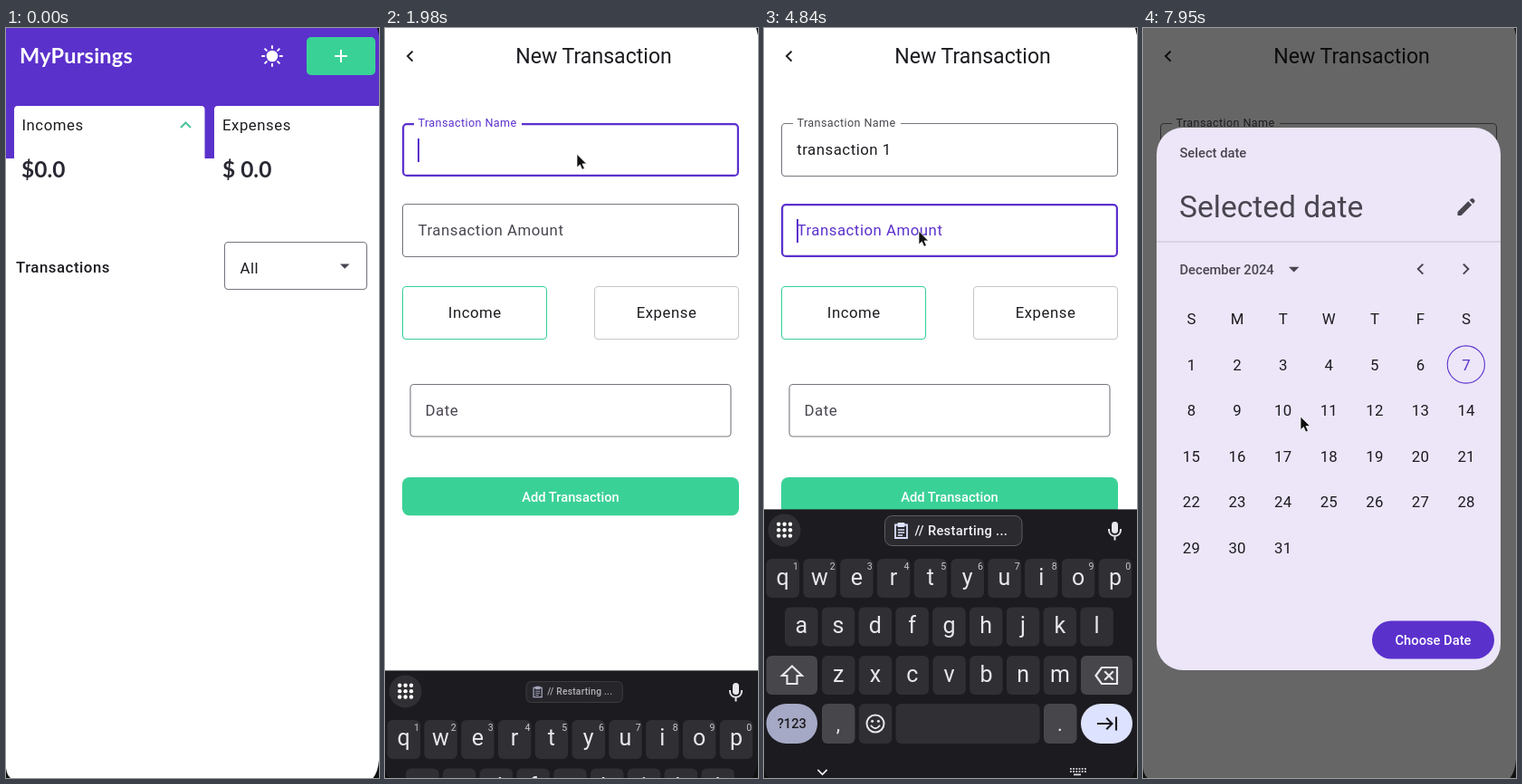
These frames come from a looping animation (412 by 828 pixels, 8 s). An HTML page:

```html
<!DOCTYPE html>
<html lang="en">
<head>
<meta charset="utf-8">
<title>Budget app</title>
<style>
  html, body { margin: 0; width: 100%; height: 100%; overflow: hidden; background: #fff; }
  svg { display: block; width: 412px; height: 828px; }
  text { font-family: Roboto, sans-serif; white-space: pre; }
  .round { font-family: Lato, sans-serif; font-weight: 700; }
  .line { fill: none; stroke-linecap: square; }
</style>
</head>
<body>
<svg id="stage" viewBox="0 0 412 828"></svg>
<script>
const LOOP = 8000;
const INK = '#1d1b20', SOFT = '#49454f', EDGE = '#79757f';
const PURPLE = '#5b31cc', GREEN = '#3ad197';
const KEY = '#303034', KEY2 = '#47464b', PALE = '#dde2ff', GLYPH = '#e8e7eb';

// ---- markup helpers
const text = (x, y, s, size, fill = INK, more = '') =>
  `<text x="${x}" y="${y}" font-size="${size}" fill="${fill}" ${more}>${s}</text>`;
const MID = 'text-anchor="middle" ';
const WIDE = 'letter-spacing=".52" ';
const BOLD = 'font-weight="500" ';
const box = (x, y, w, h, r, fill, more = '') =>
  `<rect x="${x}" y="${y}" width="${w}" height="${h}" rx="${r}" fill="${fill}" ${more}/>`;
const frame = (x, y, w, h, color, more = '') =>
  box(x, y, w, h, 4, 'none', `stroke="${color}" stroke-width="1.1" ${more}`);
const line = (d, color, w = 2, more = '') =>
  `<path class="line" d="${d}" stroke="${color}" stroke-width="${w}" ${more}/>`;
const shape = (d, fill) => `<path d="${d}" fill="${fill}"/>`;
const group = (body, more = '') => `<g ${more}>${body}</g>`;
const at = (x, y, body) => group(body, `transform="translate(${x} ${y})"`);
const times = (n, f) => Array.from({ length: n }, (_, i) => f(i)).join('');

// ---- home screen
function home() {
  const ray = i => `<path d="M0-8.7V-11" stroke="#fff" stroke-width="2" stroke-linecap="round" transform="rotate(${i * 45})"/>`;
  return box(0, 0, 412, 828, 0, '#fff') + box(0, 0, 412, 144, 0, PURPLE) +
    text(15, 39, 'MyPursings', 23.5, '#fff', 'class="round" letter-spacing=".2"') +
    at(294, 31, '<circle r="6.3" fill="#fff"/>' + times(8, ray)) +
    box(332, 10, 76, 42, 5, GREEN) + line('M364 31H376M370 25V37', '#fff', 2) +
    box(9, 86, 210.5, 90, 4, '#fff') + box(230, 86, 190, 90, 4, '#fff') +
    text(17.5, 113, 'Incomes', 16.8, INK, WIDE) + text(239, 113, 'Expenses', 16.8, INK, WIDE) +
    line('M193.7 109.3L198.5 104.5 203.3 109.3', '#4cc39a') +
    text(17, 164.5, '$0.0', 24.5, '#2a2833', 'class="round"') +
    text(239, 164.5, '$ 0.0', 24.5, '#2a2833', 'class="round"') +
    text(11, 269.5, 'Transactions', 16.8, INK, BOLD + WIDE) +
    frame(241.5, 236.5, 157, 52, EDGE) + text(258.5, 271, 'All', 16.8, INK, WIDE) +
    shape('M369 260.5H379.5L374.2 265.8z', SOFT);
}

// ---- form
const field = (id, y, label) =>
  frame(19.5, y + .5, 371, 58, EDGE, `id="${id}Box"`) +
  box(32, y - 2, 0, 5, 0, '#fff', `id="${id}Gap"`) +
  text(36.5, y + 35, label, 16.8, SOFT, `id="${id}Label" letter-spacing=".031em"`) +
  text(36.2, y + 35, '', 16.8, INK, `id="${id}Text" letter-spacing=".52"`);

function form() {
  return box(0, 0, 412, 828, 0, '#fff') +
    line('M29.8 26.3L25 31.1 29.8 35.9', INK) +
    text(230.5, 39, 'New Transaction', 23.1, INK, MID) +
    field('name', 105, 'Transaction Name') + field('sum', 194, 'Transaction Amount') +
    frame(19.5, 285.5, 159, 58, GREEN) + frame(231.5, 285.5, 159, 58, '#c8c6cb') +
    text(99.3, 320, 'Income', 16.8, INK, MID + WIDE) +
    text(311, 320, 'Expense', 16.8, INK, MID + WIDE) +
    frame(28, 393.5, 354, 57.5, EDGE) + text(44.5, 428, 'Date', 16.8, SOFT, WIDE) +
    box(19, 496, 372, 42.3, 8, GREEN) +
    text(205, 523, 'Add Transaction', 14.7, '#fff', MID + BOLD) +
    box(36, 141, 51, 1.4, 0, INK, 'id="under"') +
    box(36, 122, 2, 26, 0, PURPLE, 'id="caret"');
}

// ---- keyboards
const eraser = (x, y, color) => at(x, y,
  line('M-12 0L-5.5-9H11.5V9H-5.5z', color, 2.2) + line('M-1.5-4L6.5 4M6.5-4L-1.5 4', color, 2.2));

function chip(x, w, label) {
  const icon = line('M-6.5-6.5H6.5V8H-6.5z', PALE, 1.8) + box(-4, -9, 8, 5, 1, PALE) +
    line('M-3-1H3M-3 2H3M-3 5H1', PALE, 1.3);
  return box(x + .5, 538.5, w, 33, 8, '#2b2a2f', 'stroke="#5f5e64"') +
    at(x + 18.5, 555, icon) + text(x + 33.5, 560, label, 14.7, '#f2f1f5', BOLD + 'letter-spacing=".3"');
}

function letters() {
  const key = (x, y, c, w = 36.5) => box(x, y, w, 43, 6, KEY) + text(x + 18.2, y + 28.5, c, 25, GLYPH, MID);
  const row = (s, x, y) => times(s.length, i => key(x + 40.8 * i, y, s[i]));
  const digit = i => text(35 + 40.8 * i, 598, (i + 1) % 10, 10.5, '#c9c8cd', MID);
  const dot = i => `<circle cx="${16.2 + 6.4 * (i % 3)}" cy="${547.8 + 6.4 * (i / 3 | 0)}" r="2.2" fill="#fff"/>`;
  const mic = box(-3.5, -10, 7, 13, 3.5, GLYPH) + line('M-6.5-1C-6.5 8 6.5 8 6.5-1M0 6V9.5', GLYPH, 2);
  const smile = '<circle r="9.5" fill="none" stroke="#e8e7eb" stroke-width="2"/>' +
    '<circle cx="-3.4" cy="-2.8" r="1.5" fill="#e8e7eb"/><circle cx="3.4" cy="-2.8" r="1.5" fill="#e8e7eb"/>' +
    line('M-4.5 2.5Q0 8 4.5 2.5', GLYPH, 1.9);
  return '<circle cx="22.5" cy="554.5" r="18" fill="#303034"/>' + times(9, dot) + at(387.5, 555, mic) +
    group(chip(133, 151.5, '// Restarting ...'), 'id="chip"') +
    row('qwertyuiop', 2.5, 586) + times(10, digit) + row('asdfghjkl', 23, 639.5) + row('zxcvbnm', 64, 693) +
    box(2.5, 693, 56.5, 43, 6, KEY2) + box(350, 693, 57, 43, 6, KEY2) +
    line('M31 704.5L42 715H36.5V724H25.5V715H20z', GLYPH, 2.1) + eraser(378.5, 715, GLYPH) +
    box(2.5, 746, 56.5, 44, 22, '#a6a9c5') + text(30.8, 773, '?123', 14.7, INK, MID + BOLD) +
    box(64, 746, 36.5, 44, 6, KEY2) + text(82, 776, ',', 22, GLYPH, MID) +
    box(104.8, 746, 36.5, 44, 6, KEY) + at(123, 768, smile) +
    box(145.5, 746, 159, 44, 6, KEY) +
    box(309, 746, 36.5, 44, 6, KEY2) + text(327, 776, '.', 22, GLYPH, MID) +
    box(350, 746, 57, 44, 22, PALE) + line('M369 768H384M379 762.5L384.5 768 379 773.5M389 761.5V774.5', INK, 2.1);
}

function digits() {
  const tints = [KEY2, KEY2, '#ffd7f8', PALE];
  const key = i => {
    const c = i % 4, r = i / 4 | 0, x = 2.5 + 102.4 * c, y = 586 + 52.6 * r;
    return box(x, y, 97.5, 46.5, 23, c < 3 ? KEY : tints[r]) +
      (c < 3 ? text(x + 49, y + 34.5, '123456789,0.'[r * 3 + c], 31, GLYPH, MID) : '');
  };
  return chip(102, 169, '// Restarting filt...') + times(16, key) +
    line('M353 611H364.5', GLYPH, 2) + line('M348 660V664H369V660', GLYPH, 2) +
    eraser(358.5, 715, INK) + line('M350.5 767.5L355.5 772.5 366 762', INK, 2);
}

function keyboard() {
  const speck = i => box(338 + 3.2 * (i % 6), 817 + 3 * (i / 6 | 0), 1.8, 1.8, 0, '#d8d7db');
  return box(0, 531.4, 412, 310, 0, '#1c1b20') +
    group(letters(), 'id="abc"') + group(digits(), 'id="num"') +
    line('M60 819.5L64.5 824 69 819.5', '#fff', 1.7) + times(12, speck) + box(342, 823.4, 8, 1.8, 0, '#d8d7db');
}

// ---- date dialog
function dialog() {
  const col = i => 53.5 + 50.6 * (i % 7);
  const day = i => text(col(i), 377.5 + 50.6 * (i / 7 | 0), i + 1, 16.8, i === 6 ? PURPLE : INK, MID + 'letter-spacing=".2"');
  return box(15, 110, 380, 599, 29, '#ece6f8') +
    text(40.5, 142.5, 'Select date', 14.7, SOFT, BOLD) +
    text(40, 209, 'Selected date', 33.6, SOFT) +
    at(357, 197.5, shape('M-9.5 9.5V5.5L2.2-6.2 6.2-2.2-5.5 9.5zM3.6-7.6L5.8-9.2Q6.8-9.8 7.8-9L9.2-7.5Q9.8-6.5 9.2-5.6L7.6-3.6z', SOFT)) +
    box(15, 235.5, 380, 1, 0, '#c8c2d0') +
    text(40.5, 271.5, 'December 2024', 14.7, SOFT, BOLD) +
    shape('M161 263.7H172.4L166.7 269.4z', SOFT) +
    line('M308.6 261.3L303.8 266.1 308.6 270.9M354.5 261.3L359.3 266.1 354.5 270.9', SOFT) +
    times(7, i => text(col(i), 327, 'SMTWTFS'[i], 16.8, INK, MID)) + times(31, day) +
    `<circle cx="356.8" cy="371.5" r="20.6" fill="none" stroke="${PURPLE}" stroke-width="1.1"/>` +
    box(253, 654.5, 135, 42, 21, PURPLE) +
    text(320.5, 681, 'Choose Date', 14.7, '#fff', MID + BOLD);
}

const stage = document.getElementById('stage');
stage.innerHTML = group(home(), 'id="home"') + group(form(), 'id="form"') + group(keyboard(), 'id="keys"') +
  box(0, 0, 412, 828, 0, '#000', 'id="scrim"') + group(dialog(), 'id="dialog"') +
  shape('M0 817Q1 825 5 828H0zM412 808Q411 821 405.5 828H412zM412 0V8L410 0z', '#111') +
  '<path id="mouse" d="M0 0V14.6L3.4 11.6 5.8 17 8.4 15.8 6 10.6H10.6z" fill="#111" stroke="#fff" stroke-width=".7"/>';
const ui = {};
stage.querySelectorAll('[id]').forEach(e => ui[e.id] = e);

// ---- timing
const clamp = v => Math.max(0, Math.min(1, v));
const span = (t, a, b) => clamp((t - a) / (b - a));
function bezier(x1, y1, x2, y2) {
  const f = (a, b, s) => 3 * a * s * (1 - s) ** 2 + 3 * b * s * s * (1 - s) + s ** 3;
  return x => {
    let lo = 0, hi = 1;
    for (let i = 0; i < 20; i++) {
      const m = (lo + hi) / 2;
      if (f(x1, x2, m) < x) lo = m; else hi = m;
    }
    return f(y1, y2, (lo + hi) / 2);
  };
}
const standard = bezier(.4, 0, .2, 1), emphasized = bezier(.2, 0, 0, 1);

const typed = {
  name: { s: 'transaction 1', at: [2440, 2590, 2690, 2790, 2890, 2990, 3370, 3570, 3685, 3800, 3800, 3915, 4030] },
  sum: { s: '2500', at: [5720, 5980, 6130, 6200] },
};
const track = [
  [70, 265, 822], [680, 368, 24], [920, 368, 24], [1200, 291, 94.5], [1600, 212, 139.3], [4300, 212, 139.3],
  [4640, 171, 224.3], [6660, 171, 224.3], [6960, 258, 552], [7280, 121, 433.5], [7560, 121, 433.5], [7950, 174, 429],
];

function mouseAt(t) {
  let i = track.findIndex(k => k[0] > t);
  if (i < 0) return track[track.length - 1].slice(1);
  i = Math.max(i, 1);
  const [a, x, y] = track[i - 1], [b, u, v] = track[i], p = span(t, a, b);
  return [x + (u - x) * p, y + (v - y) * p];
}

function set(e, attrs) {
  for (const k in attrs) e.setAttribute(k, attrs[k]);
}
const show = (e, on) => e.setAttribute('visibility', on ? 'visible' : 'hidden');

function drawField(id, y, gap, up, focused, t) {
  const { s, at: keys } = typed[id], n = keys.filter(k => k <= t).length;
  const inset = focused ? 1.1 : .5; // the outline grows inwards
  set(ui[id + 'Box'], {
    x: 19 + inset, y: y + inset, width: 372 - 2 * inset, height: 59 - 2 * inset,
    stroke: focused ? PURPLE : EDGE, 'stroke-width': focused ? 2.2 : 1.1,
  });
  set(ui[id + 'Gap'], { width: gap * up });
  set(ui[id + 'Label'], { y: y + 35 - 31 * up, 'font-size': 16.8 - 4.2 * up, fill: focused ? PURPLE : SOFT });
  const value = s.slice(0, n);
  if (ui[id + 'Text'].textContent !== value) ui[id + 'Text'].textContent = value;
  return n;
}

function draw(t) {
  const fade = standard(span(t, 900, 1600));
  set(ui.home, { opacity: 1 - fade });
  set(ui.form, { opacity: fade });

  const onSum = t >= 4840, focused = t >= 1770;
  const n = drawField('name', 105, 119, standard(span(t, 1770, 1920)), focused && !onSum, t);
  const m = drawField('sum', 194, 130, standard(span(t, 4840, 4990)), onSum, t);
  const id = onSum ? 'sum' : 'name', count = onSum ? m : n;
  const last = count ? typed[id].at[count - 1] : onSum ? 4690 : 1850;
  show(ui.caret, focused && t < 7480 && Math.floor((t - last) / 500) % 2 <= 0);
  set(ui.caret, {
    x: 36 + (count ? ui[id + 'Text'].getComputedTextLength() + .4 : 0),
    y: onSum ? 211 : 122,
  });
  show(ui.under, t >= 3170 && t < 3370);

  const rise = emphasized(span(t, 1935, 2215)), grow = .7 + .3 * span(t, 1980, 2210);
  show(ui.abc, t < 4960);
  show(ui.num, t >= 4960);
  set(ui.keys, {
    transform: `translate(0 ${296 * (1 - rise)})`,
    display: t >= 1935 && t < 7480 ? 'inline' : 'none',
  });
  set(ui.chip, { transform: `translate(209 555) scale(${grow}) translate(-209 -555)`, opacity: grow });

  const open = span(t, 7463, 7690);
  set(ui.scrim, { opacity: .6 * open });
  set(ui.dialog, { opacity: open, transform: `translate(0 ${21 * (1 - open)})` });

  const [x, y] = mouseAt(t);
  show(ui.mouse, t >= 70);
  set(ui.mouse, { transform: `translate(${x} ${y})` });
}

const start = performance.now();
function tick() {
  draw((performance.now() - start) % LOOP);
  requestAnimationFrame(tick);
}
tick();
</script>
</body>
</html>
```
